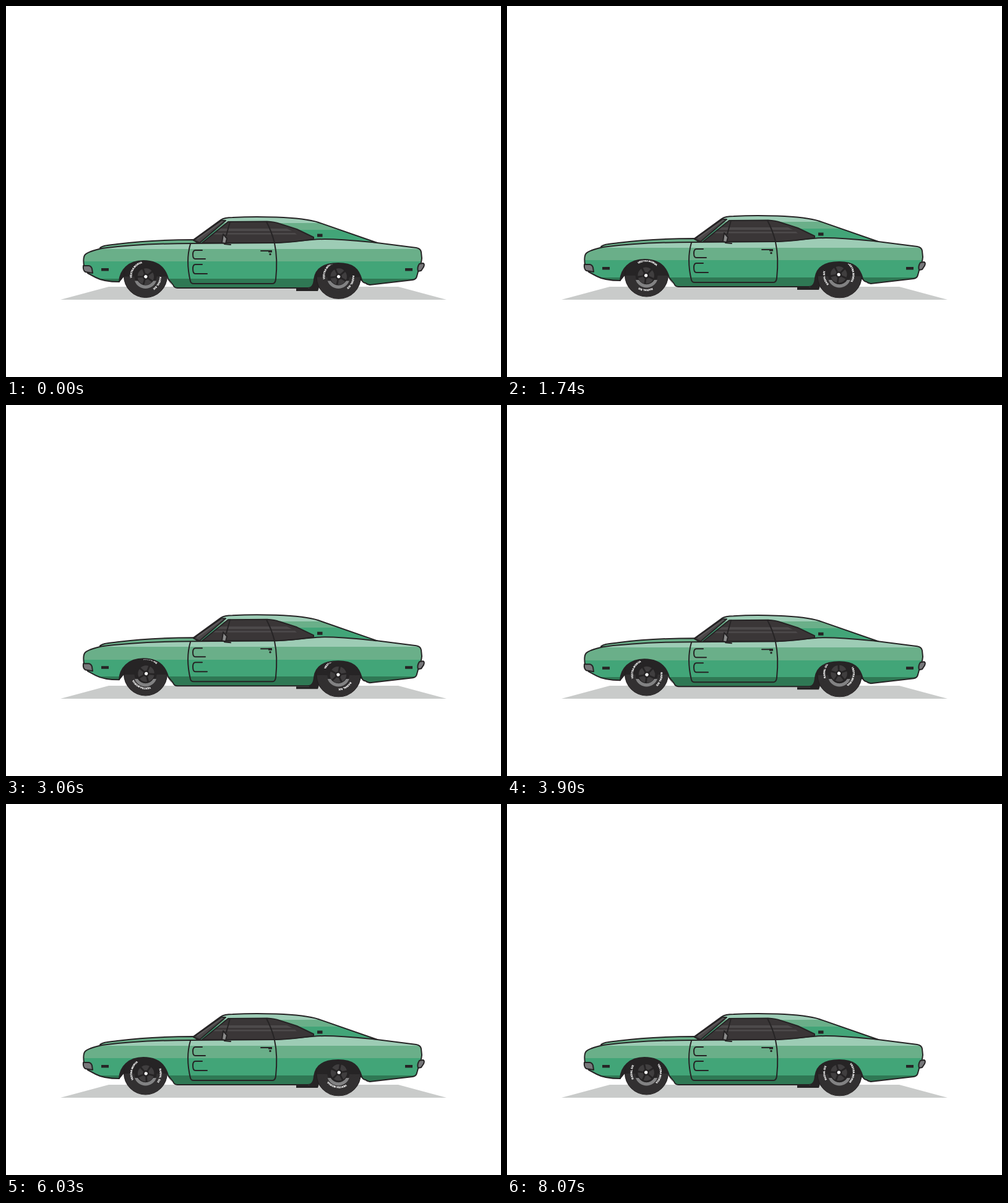
Recreate the animation shown at these times as an HTML page. Size 800 px wide and 600 px high, loop 8.1 s.

```html
<!DOCTYPE html>
<html lang="en">
<head>
<meta charset="utf-8">
<title>Green coupe</title>
<style>
html, body { margin: 0; width: 100%; height: 100%; overflow: hidden; background: #fff; }
svg { display: block; width: 800px; height: 600px; }
.line { fill: none; stroke: #262425; stroke-width: 2; stroke-linecap: round; stroke-linejoin: round; }
.dark { fill: #262425; }
.edge { stroke: #262425; stroke-width: 2; stroke-linejoin: round; }
text { font: bold 4px "Liberation Sans", Arial, sans-serif; fill: #fff; stroke: #fff; stroke-width: .25; text-anchor: middle; }
</style>
</head>
<body>
<svg viewBox="0 0 800 600">
  <defs>
    <linearGradient id="side" gradientUnits="userSpaceOnUse" x1="0" y1="370" x2="0" y2="470">
      <stop offset=".21" stop-color="#9dccb5"/><stop offset=".21" stop-color="#6aaf89"/>
      <stop offset=".415" stop-color="#6aaf89"/><stop offset=".415" stop-color="#42a578"/>
      <stop offset=".69" stop-color="#42a578"/><stop offset=".69" stop-color="#2f7854"/>
    </linearGradient>
    <linearGradient id="top" gradientUnits="userSpaceOnUse" x1="0" y1="330" x2="0" y2="390">
      <stop offset=".32" stop-color="#9dccb5"/><stop offset=".32" stop-color="#6aaf89"/>
      <stop offset=".5" stop-color="#6aaf89"/><stop offset=".5" stop-color="#42a578"/>
    </linearGradient>
    <pattern id="grain" width="2" height="2" patternUnits="userSpaceOnUse">
      <path d="M0 0h1v1h-1zM1 1h1v1h-1z" fill="#3d3b3c"/>
    </pattern>
    <path id="window" d="M317 381L359 347L422 346.500Q434 347 442 350L470 359L497 372V375Q466 380 436 381Z"/>
    <clipPath id="glass"><use href="#window"/></clipPath>
    <path id="ring" d="M0 22.500A22.500 22.500 0 0 1 0-22.500A22.500 22.500 0 0 1 0 22.500"/>
    <g id="rubber">
      <circle r="35" fill="#262425" stroke="#231f20"/>
      <path d="M-34 1A34 34 0 0 0 34 1Z" fill="url(#grain)"/>
    </g>
    <g id="dish">
      <circle r="18" fill="#262425"/>
      <path d="M-17.500 8A18.500 18.500 0 0 0 17.500 8H12.500A14.500 14.500 0 0 1-12.500 8Z" fill="#828283"/>
      <circle r="14.500" fill="#262425"/>
    </g>
    <g id="rim">
      <g id="spokes" fill="#403e3f"></g>
      <circle r="4.500" fill="#262425"/>
      <circle r="2.600" fill="#fff"/>
      <text><textPath href="#ring" startOffset="50%">VESTRA MORVA</textPath></text>
      <text transform="rotate(175)"><textPath href="#ring" startOffset="50%">RADIAL S/X</textPath></text>
    </g>
  </defs>

  <path id="shadow" fill="#c9cbca"/>

  <g class="body dark">
    <path d="M183 445C184 425 198 410 222 410C246 410 258 426 262 441L268 450L259 434H192Z"/>
    <path d="M469 455H490L500 420L536 414L565 420L580 446L570 440L510 440L504 459H469Z"/>
  </g>

  <g class="wheel">
    <use href="#rubber"/><use href="#dish"/>
    <g class="spin"><use href="#rim"/></g>
  </g>
  <g class="wheel">
    <use href="#rubber" transform="translate(.3 .9) scale(1.025)"/><use href="#dish"/>
    <g class="spin"><use href="#rim"/></g>
  </g>

  <g class="body">
    <path class="edge" fill="#6aaf89" d="M152 389C157 385 164 385 180 383C220 378 260 376 303 376L318 382L155 391Z"/>
    <path class="edge" fill="url(#top)" d="M303 376L347 344Q353 340 366 340C400 338 475 338 505 348L600 381L540 385H314Z"/>
    <path class="edge" fill="url(#side)" d="M126 418Q124 404 128 400Q133 395 155 390C200 384 250 382 300 382L436 381C465 380 490 375 515 375C545 375 570 378 600 381L663 389Q670 390 671 396L672 406Q671 416 667 424L664 435Q663 440 657 441L588 449Q583 448 581 446Q577 446 575 441C570 423 561 414 537 414C510 414 500 425 498 440Q497 454 488 454H277Q272 454 270 449L262 439C257 420 244 410 222 410C198 410 184 425 183 444Q158 444 145 437L132 430Z"/>
    <path class="edge" fill="#4a4748" d="M303 377L348 345L355 345L313 381Z"/>
    <path d="M309 375L350 346" stroke="#5c595a" stroke-width="2"/>
    <use href="#window" fill="#3a3637"/>
    <path clip-path="url(#glass)" fill="#4d4a4b" d="M340 358H454L462 362H335ZM330 365H467L470 367.500H326Z"/>
    <g class="line">
      <use href="#window"/>
      <path d="M362 347L356 369M421 347Q429 362 434 381"/>
      <path d="M298 383C293 400 293 422 298 443Q299 447 303 447H431Q435 447 436 440C438 420 438 400 434 382"/>
      <path d="M317 393H306Q302 393 302 400Q302 407 306 407H322M317 416H306Q302 416 302 423Q302 431 306 431H325M353 383L363 384"/>
      <path d="M412 394H429"/>
    </g>
    <path class="edge" fill="#8c8c8c" d="M351 367L357 374L355 382L349 381Z"/>
    <g class="dark">
      <path d="M424 393h6v3.500h-6zM154 422h12v4.500h-12zM645 422h12v4.500h-12zM503 366.500h8.500v5h-8.500z"/>
      <circle cx="427" cy="399.500" r="1.700"/>
    </g>
    <path class="edge" fill="#77777a" d="M125 418H134Q138 419 139 423L140 430L128 428Q124 425 125 418Z"/>
    <path class="edge" fill="#77777a" d="M668 415L674 414Q677 415 675 420L671 426L666 427Q664 421 668 415Z"/>
  </g>
</svg>
<script>
const $$ = s => [...document.querySelectorAll(s)];
const LOOP = 8100, STEP = 30, BEAT = 13;
const bodies = $$('.body'), shadow = $$('#shadow')[0];
// degrees per step, starting angle and resting place of each wheel
const wheels = [[-61, -55, 225.5, 435], [-59.655, -60, 537.2, 435]];
const spins = $$('.spin'), holders = $$('.wheel');

$$('#spokes')[0].innerHTML = [0, 1, 2, 3, 4].map(i =>
  `<path transform="rotate(${i * 72})" d="M-2-5L-6.500-11.500A13 13 0 0 1 6.500-11.500L2-5Z"/>`).join('');

// smooth pulse around a moment
const pulse = (n, at, half) => {
  const d = Math.abs(n - at) / half;
  return d < 1 ? (1 + Math.cos(Math.PI * d)) / 2 : 0;
};

function draw(now) {
  const n = Math.floor(now % LOOP / STEP);
  const beat = n % BEAT;
  const drop = (1.6 + .4 * Math.cos(Math.PI * n / 130)) * pulse(Math.min(beat, BEAT - beat), 0, 3);
  bodies.forEach(b => b.setAttribute('transform', `translate(0 ${drop})`));

  const dip = 1.5 * [0, 33, 70, 120, 154, 182].reduce((sum, at) => sum + pulse(n, at, 6), 0);
  wheels.forEach(([rate, start, x, y], i) => {
    holders[i].setAttribute('transform', `translate(${x} ${y + dip})`);
    // the rim sits slightly off the axle
    spins[i].setAttribute('transform', `rotate(${start + rate * n}) translate(-.77 .92)`);
  });

  const w = 6 * pulse(n, 33, 12) + 3 * pulse(n, 154, 8);
  shadow.setAttribute('d', `M${88 - w} 475L${166 - w} 454H${634 + w}L${712 + w} 475Z`);
}

const t0 = performance.now();
function tick() {
  draw(performance.now() - t0);
  requestAnimationFrame(tick);
}
tick();
</script>
</body>
</html>
```
